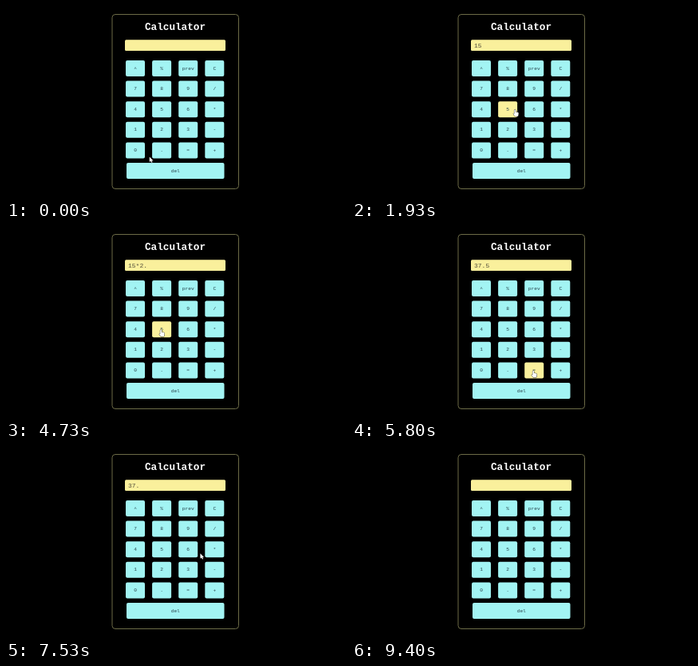
Recreate the animation shown at these times as an HTML page with a canvas. Size 426 by 240 pixels, loop 9470 ms.

```html
<!DOCTYPE html>
<html lang="en">
<head>
<meta charset="utf-8">
<title>Calculator</title>
<style>
  html, body { margin: 0; height: 100%; overflow: hidden; background: #000; }
  canvas { display: block; width: 426px; height: 240px; }
</style>
</head>
<body>
<canvas id="stage" width="426" height="240"></canvas>
<script>
const ctx = document.getElementById('stage').getContext('2d');
const LOOP = 9470, FPS = 15, REST = 150;
const YELLOW = '#faf09c', CYAN = '#a2f4f3';
const MONO = '"Liberation Mono", "Courier New", monospace';

const colX = col => 162 + col * 33.1;
const rowY = row => 78 + row * 25.6;

const labels = '^ % prev C 7 8 9 / 4 5 6 * 1 2 3 - 0 . = +'.split(' ');
const keys = labels.map((label, i) => ({
  label, x: colX(i % 4) - 12, y: rowY(Math.floor(i / 4)) - 10, w: 24, h: 20
}));
keys.push({ label: 'del', x: 151, y: rowY(5) - 10, w: 122.5, h: 20 });

// Stops of the pointer in key columns and rows, with the display from then on
const stops = [
  { time: 0, col: 0.57, row: 4.33, shown: '' },
  { time: 850, col: 0, row: 3, shown: '1' },
  { time: 1630, col: 1, row: 2, shown: '15' },
  { time: 2400, col: 3, row: 2, shown: '15*' },
  { time: 2870, col: 2, row: 4, shown: '15*' },
  { time: 3650, col: 1, row: 3, shown: '15*2' },
  { time: 4200, col: 1, row: 4, shown: '15*2.' },
  { time: 4750, col: 1, row: 2, shown: '15*2.5' },
  { time: 5600, col: 2, row: 4, shown: '37.5' },
  { time: 6600, col: 2, row: 4.9, shown: '37.' },
  { time: 8200, col: 2.88, row: 0.1, shown: '' },
  { time: 8900, col: 4.1, row: 0.2, shown: '' }
];

const smooth = u => u * u * (3 - 2 * u);

// Rest a moment at each stop, then glide to the next; gone after the last
function stateAt(t) {
  const i = stops.findLastIndex(s => s.time <= t);
  const from = stops[i], to = stops[i + 1];
  if (!to) return { shown: from.shown };
  const start = from.time + REST;
  const e = smooth(Math.max(0, (t - start) / (to.time - start)));
  return {
    shown: from.shown,
    pointer: {
      x: colX(from.col + (to.col - from.col) * e) - 1,
      y: rowY(from.row + (to.row - from.row) * e)
    }
  };
}

function box(x, y, w, h, r, color) {
  ctx.beginPath();
  ctx.roundRect(x, y, w, h, r);
  ctx.fillStyle = color;
  ctx.fill();
}

function text(str, x, y, font, color, align = 'center') {
  ctx.font = `${font} ${MONO}`;
  ctx.fillStyle = color;
  ctx.textAlign = align;
  ctx.fillText(str, x, y);
}

const arrow = new Path2D('M0 0V6L1.5 4.8L2.5 7L3.5 6.5L2.6 4.5H4.4Z');
const hand = new Path2D('M-.8 .7Q0-.2 .8 .7V3.2L3.6 3.8Q4.6 4 4.4 5.2L3.8 8.6H-.2L-2.2 5.6Q-2 4.6-.8 5.6Z');

function drawPointer({ x, y }, shape) {
  ctx.save();
  ctx.translate(x, y);
  ctx.lineWidth = 0.9;
  ctx.strokeStyle = '#333';
  ctx.stroke(shape);
  ctx.fillStyle = '#fff';
  ctx.fill(shape);
  ctx.restore();
}

function draw(t) {
  const { shown, pointer } = stateAt(t);
  const inside = k => pointer.x >= k.x && pointer.x <= k.x + k.w &&
                      pointer.y >= k.y && pointer.y <= k.y + k.h;
  const hovered = pointer && keys.find(inside);

  ctx.fillStyle = '#000';
  ctx.fillRect(0, 0, 426, 240);
  ctx.beginPath();
  ctx.roundRect(133, 10.5, 158.5, 218, 4);
  ctx.lineWidth = 1;
  ctx.strokeStyle = '#6c6b47';
  ctx.stroke();

  text('Calculator', 212, 30, 'bold 12.7px', '#fff');
  box(149, 42.3, 126, 13.6, 1.5, YELLOW);
  text(shown, 153, 51.5, '8px', '#55503c', 'left');

  for (const k of keys) {
    box(k.x, k.y, k.w, k.h, 2, k === hovered ? YELLOW : CYAN);
    text(k.label, k.x + k.w / 2, k.y + 11.6, '6.2px', '#28444c');
  }
  if (pointer) drawPointer(pointer, hovered ? hand : arrow);
}

function tick() {
  const frame = Math.floor((performance.now() % LOOP + 5) * FPS / 1000);
  draw(frame * 1000 / FPS);
  requestAnimationFrame(tick);
}
tick();
</script>
</body>
</html>
```
